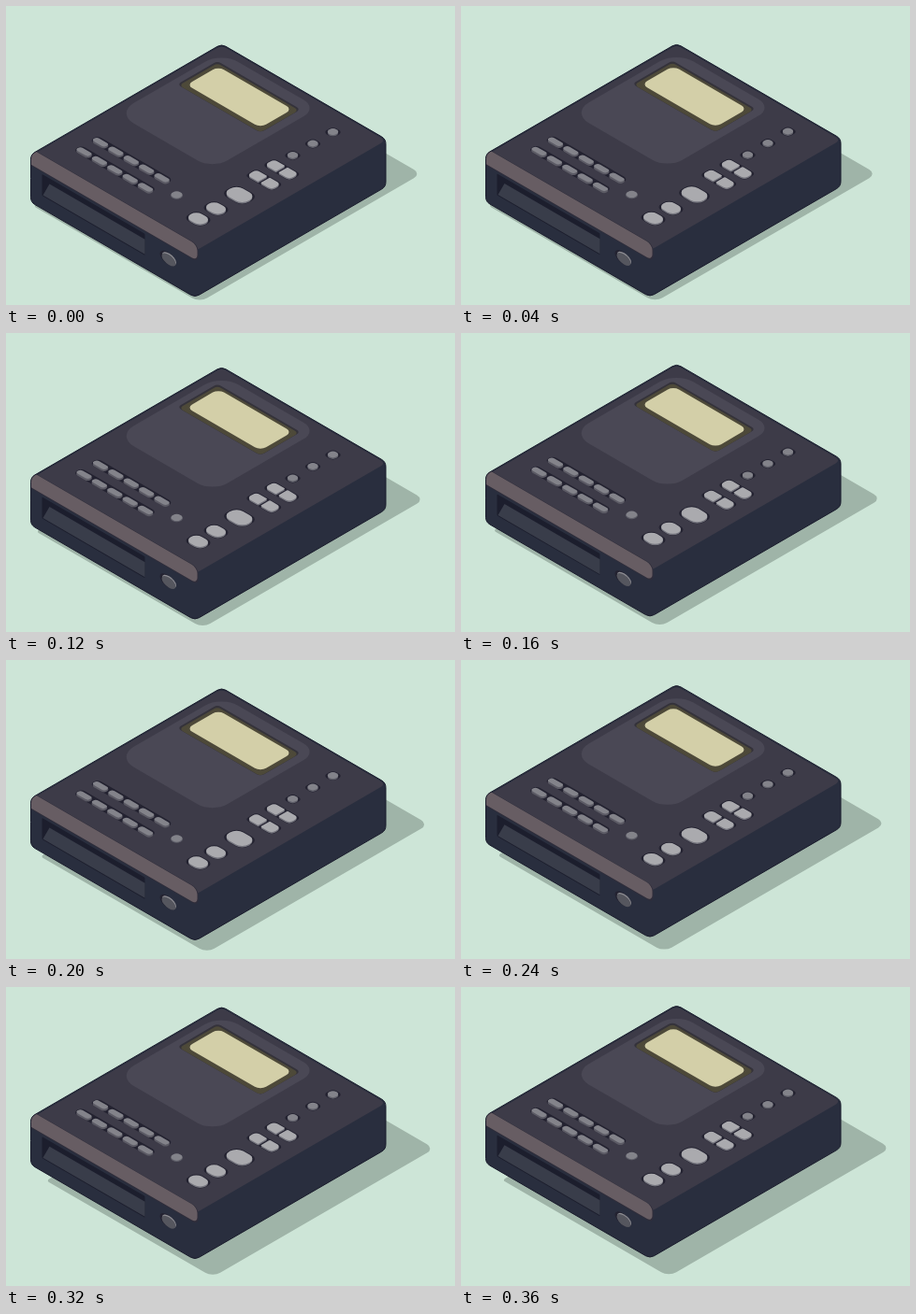
Write an HTML page with a canvas that moves like this. It is 480 by 320 pixels and loops after 0.4 s.

```html
<!DOCTYPE html>
<html>
<head>
<meta charset="utf-8">
<style>
html, body { margin: 0; overflow: hidden; background: #cde5d7; }
canvas { display: block; }
</style>
</head>
<body>
<canvas id="stage" width="480" height="320"></canvas>
<script>
const ctx = document.getElementById('stage').getContext('2d');
const LOOP = 400, STEP = 40;

// u runs down the front edge, v up the left edge, z downwards.
const SLOPE = 0.58, LEFT = 26.5, TOP = 159;
const WIDTH = 175.5, DEPTH = 204, HEIGHT = 51;
const DARK = '#232230', LIGHT = '#aaaaae', GREY = '#83838a';

const project = (u, v, z) => [LEFT + u + v, TOP + SLOPE * (u - v) + z];

function onTop(z, paint) {
  ctx.save();
  ctx.transform(1, SLOPE, 1, -SLOPE, LEFT, TOP + z);
  paint();
  ctx.restore();
}

function onFront(paint) {
  ctx.save();
  ctx.transform(1, SLOPE, 0, 1, LEFT, TOP);
  paint();
  ctx.restore();
}

function box(x, y, w, h, r, fill) {
  ctx.beginPath();
  ctx.roundRect(x, y, w, h, r);
  ctx.fillStyle = fill;
  ctx.fill();
}

// Rounded tile on the top plane, placed by its centre and lowered by z.
function tile(u, v, w, h, r, fill, z = 0) {
  onTop(z, () => box(u - w / 2, v - h / 2, w, h, r, fill));
}

function key(u, v, w, h, r, top, side = '#74747d') {
  tile(u, v, w + 2.5, h + 2.5, r, DARK, 1);
  tile(u, v, w, h, r, side, 2);
  tile(u, v, w, h, r, top, 0.5);
}

function drawShadow() {
  onTop(HEIGHT + 2.5, () => box(2.5, 0, 178, 237, [3, 8, 8, 8], '#9fb4a8'));
}

function bodyPath() {
  const corners = [[0, 0, 0], [0, DEPTH, 0], [WIDTH, DEPTH, 0],
    [WIDTH, DEPTH, HEIGHT], [WIDTH, 0, HEIGHT], [0, 0, HEIGHT]].map(c => project(...c));
  ctx.beginPath();
  ctx.moveTo(...project(0, 0, HEIGHT / 2));
  corners.forEach((c, i) => ctx.arcTo(...c, ...corners[(i + 1) % 6], 9));
  ctx.closePath();
}

function drawBody() {
  bodyPath();
  ctx.fillStyle = '#292e3e';
  ctx.fill();
  ctx.save();
  ctx.clip();
  tile(WIDTH / 2, DEPTH / 2, WIDTH, DEPTH, 5, '#3d3b48', 1.5);
  onFront(() => {
    box(-20, -7, 199, 18.5, 6, '#2f2d3a');
    box(-20, -6.5, 198, 17, 6, '#675d63');
  });
  ctx.restore();
  bodyPath();
  ctx.strokeStyle = '#1a1c2c';
  ctx.stroke();
}

function disc(x, y, rx, ry, fill) {
  ctx.beginPath();
  ctx.ellipse(x, y, rx, ry, 0, 0, Math.PI * 2);
  ctx.fillStyle = fill;
  ctx.fill();
}

function drawFront() {
  onFront(() => {
    box(12, 14, 110, 23, 1, '#1c1e2d');
    ctx.beginPath();
    ctx.moveTo(20, 20);
    ctx.lineTo(122, 20);
    ctx.lineTo(122, 36);
    ctx.lineTo(13, 36);
    ctx.fillStyle = '#393d4a';
    ctx.fill();
    disc(146.5, 26, 8.5, 6.5, DARK);
    disc(148, 25.5, 7.5, 5.5, '#8c8c92');
    disc(147.5, 27, 7.5, 5.5, '#55565e');
  });
}

function drawScreen() {
  tile(59, 140, 103, 112.7, [19, 16, 15, 18], '#4a4855');
  tile(58, 164.5, 89, 43, 4, '#34323a');
  tile(58, 164.5, 87, 41, 4, '#4d4939', 1);
  tile(58, 165, 79, 34, 6, '#d3cfa8', 0.5);
}

function drawKeys() {
  for (const v of [31, 48.5]) {
    tile(59, v, 81, 9, 4.5, DARK);
    for (let i = 0; i < 5; i++) {
      const u = 26 + 16.4 * i;
      tile(u, v, 14, 6.5, 3.2, '#5c5b65', 1.5);
      tile(u, v, 13.5, 5.5, 2.7, GREY, -0.2);
    }
  }
  tile(115, 41, 9, 9, 4.5, '#5f5f69', 1);
  tile(115, 41, 8.5, 8.5, 4.2, GREY);
  for (let i = 0; i < 3; i++) key(140, 140 + 21.5 * i, 8, 8, 4, GREY, '#5f5f69');

  // Main controls share one line along the right edge.
  const line = 148;
  for (const v of [31, 50]) key(line, v, 16, 12, 6, LIGHT);
  key(line, 75, 21, 15, 7, LIGHT);
  for (const v of [102, 121]) {
    key(line - 8, v, 12, 10, [4, 1, 1, 4], LIGHT);
    key(line + 6.5, v, 12, 10, [1, 4, 4, 1], LIGHT);
  }
}

function draw(now) {
  const t = Math.floor(now % LOOP / STEP) * STEP;
  const lift = (1 - Math.cos(Math.PI * t / LOOP)) / 2;
  ctx.fillStyle = '#cde5d7';
  ctx.fillRect(0, 0, 480, 320);
  ctx.save();
  ctx.translate(15.5 * lift, -7.5 * lift);
  drawShadow();
  ctx.restore();
  ctx.save();
  ctx.translate(0, -22 * lift);
  drawBody();
  drawFront();
  drawScreen();
  drawKeys();
  ctx.restore();
}

const start = performance.now();
function frame() {
  draw(performance.now() - start);
  requestAnimationFrame(frame);
}
frame();
</script>
</body>
</html>
```
